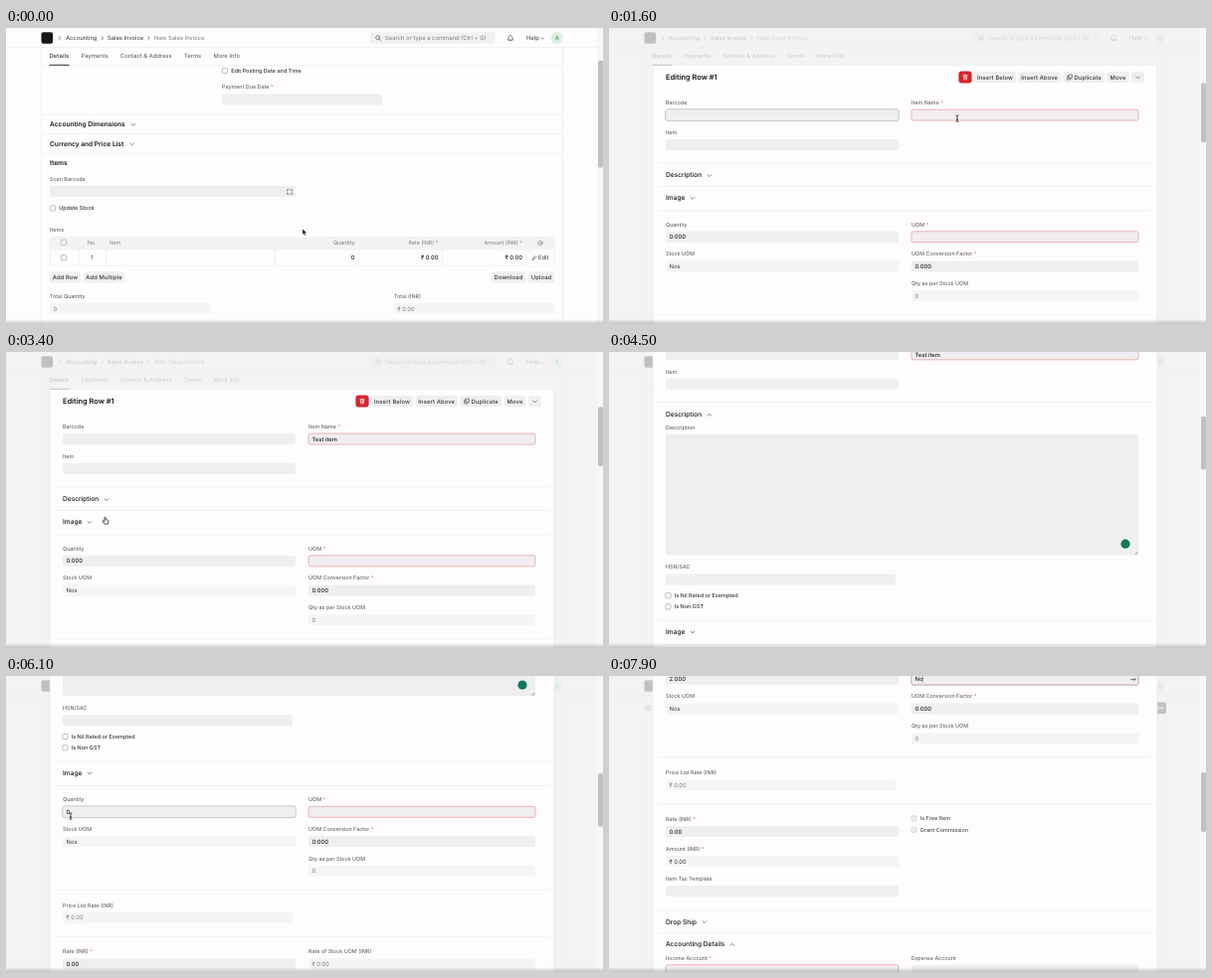
Write an HTML page that moves like this. It is 600 by 298 pixels and loops after 8000 ms.

```html
<!DOCTYPE html>
<html lang="en">
<head>
<meta charset="utf-8">
<title>New Sales Invoice</title>
<style>
html, body { margin: 0; width: 100%; height: 100%; overflow: hidden; background: #fefcfe; }
svg { display: block; width: 600px; height: 298px; font-family: Inter, Roboto, sans-serif; text-rendering: geometricPrecision; }
text { font-size: 5.83px; fill: #383838; white-space: pre; }
.l { font-size: 5.42px; fill: #525252; }
.v { font-weight: 500; fill: #1f1f1f; }
.dim { fill: #7c7c7c; }
.c { font-size: 5.5px; font-weight: 500; }
.h { font-size: 6.6px; font-weight: 600; fill: #171717; }
.m { font-size: 6.6px; font-weight: 500; fill: #171717; }
.t { font-size: 7.4px; font-weight: 600; fill: #171717; }
.b { font-weight: 500; letter-spacing: .02em; }
.tab { fill: #525252; }
.end { text-anchor: end; }
.mid { text-anchor: middle; }
.req { fill: #e57373; }
.in { fill: #f0eef0; }
.ro, .fixed { fill: #f6f5f6; }
.err { fill: #f0eef0; stroke: #e9a3a3; stroke-width: .8; }
.focus { fill: none; stroke: #c4c2c4; stroke-width: .9; }
.line { stroke: #ebeaeb; stroke-width: .6; }
.ico { fill: none; stroke: #525252; stroke-width: .7; stroke-linecap: round; stroke-linejoin: round; }
.box { fill: #fff; stroke: #8d8d8d; stroke-width: .6; }
.off { fill: #eeedee; stroke: #c9c8c9; stroke-width: .6; }
</style>
</head>
<body>
<svg id="stage" viewBox="0 0 600 298"></svg>
<script>
const LOOP = 8000, STEP = 100, FORM_Y = 185, GROW = 196, PAPER = '#fefcfe';

// Drawing helpers; text is placed by its vertical middle.
const text = (x, y, s, cls = '', id = '') =>
  `<text x="${x}" y="${y}" dy=".36em" class="${cls}" id="${id}">${s.replace(/ \*$/, ' <tspan class="req">*</tspan>')}</text>`;
const rect = (x, y, w, h, cls, r = 2, id = '') =>
  `<rect x="${x}" y="${y}" width="${w}" height="${h}" rx="${r}" class="${cls}" id="${id}"/>`;
const fill = (x, y, w, h, color, r = 0) =>
  `<rect x="${x}" y="${y}" width="${w}" height="${h}" rx="${r}" fill="${color}"/>`;
const hline = (x1, x2, y) => `<path class="line" d="M${x1} ${y}H${x2}"/>`;
const vline = (x, y1, y2) => `<path class="line" d="M${x} ${y1}V${y2}"/>`;
const icon = (x, y, d, extra = '') => `<path class="ico" transform="translate(${x} ${y})" d="${d}" ${extra}/>`;
const group = (id, body) => `<g id="${id}">${body}</g>`;
const DOWN = 'M-1.9 -.9L0 1L1.9 -.9', UP = 'M-1.9 .9L0 -1L1.9 .9', RIGHT = 'M-.8 -1.5L.8 0L-.8 1.5';

const valueClass = { ro: 'dim', fixed: '' };
const field = (x, y, w, label, value = '', cls = 'in', id = '') =>
  text(x, y, label, 'l') + rect(x, y + 7.1, w, 11, cls) +
  text(x + 3.5, y + 12.7, value, valueClass[cls] ?? 'v', id);
const ring = (x, w, y, id) => rect(x - .3, y + 6.7, w + .6, 11.8, 'focus', 2.3, id);
const check = (x, y, label, cls = 'box') =>
  rect(x + .4, y - 2.6, 5.2, 5.2, cls, 1.2) + text(x + 9.2, y, label, cls === 'off' ? 'c l' : 'c');
const button = (x, y, w, label) =>
  fill(x, y - 5.6, w, 11.2, '#f0eff0', 2) + text(x + w / 2, y, label, 'b mid');
const section = (y, label, chevX, cls = 'm', d = DOWN) =>
  text(cls === 'h' ? 44 : 57, y, label, cls) + icon(chevX, y + .4, d);

const page = [
  vline(35.7, 0, 900), vline(559.5, 0, 900),
  check(217, 43, 'Edit Posting Date and Time'),
  field(217, 59.5, 161, 'Payment Due Date *'),
  [87, 106.7, 126.3].map(y => hline(36, 559, y)).join(''),
  section(97, 'Accounting Dimensions', 128, 'h'),
  section(116.5, 'Currency and Price List', 126.5, 'h'),
  text(44, 136, 'Items', 'h'),
  field(44, 152, 247, 'Scan Barcode'),
  icon(285, 165, 'M-2.4 -1V-2.2H-1M1 -2.2H2.4V-1M2.4 1V2.2H1M-1 2.2H-2.4V1'),
  check(44, 181.5, 'Update Stock'),
  text(44, 203, 'Items', 'l'),
  fill(44, 210, 507, 12.5, '#f3f2f3', 2),
  rect(55.4, 213.4, 5.2, 5.2, 'box', 1.2),
  text(82, 216.3, 'No.', 'l dim'), text(104, 216.3, 'Item', 'l dim'),
  text(350.5, 216.3, 'Quantity', 'l dim end'),
  text(434.5, 216.3, 'Rate (INR) *', 'l dim end'),
  text(519, 216.3, 'Amount (INR) *', 'l dim end'),
  '<g class="ico" style="stroke:#8a8a8a;stroke-width:.6"><circle cx="537" cy="216.5" r="2.3"/><circle cx="537" cy="216.5" r=".8"/></g>',
  hline(44, 551, 223), hline(44, 551, 239.3), vline(44.2, 212, 239), vline(550.8, 212, 239),
  [73, 100.5, 270, 354.5, 438.5, 523].map(x => vline(x, 222.5, 239)).join(''),
  rect(55.4, 228.6, 5.2, 5.2, 'box', 1.2),
  text(86.5, 231.3, '1', 'mid'),
  text(350.5, 231.3, '0', 'v end'), text(434.5, 231.3, '₹ 0.00', 'v end'), text(519, 231.3, '₹ 0.00', 'v end'),
  icon(531, 231.5, 'M-1.7 1.7L-1.2 .3L1 -1.9L1.9 -1L-.3 1.2Z'), text(535, 231.3, 'Edit'),
  button(44, 251, 31, 'Add Row'), button(78, 251, 41, 'Add Multiple'),
  button(488, 251, 34, 'Download'), button(525, 251, 26, 'Upload'),
  field(44, 270, 161, 'Total Quantity', '0', 'ro'),
  field(390, 270, 161, 'Total (INR)', '₹ 0.00', 'ro')
].join('');

const header = group('tabs',
  fill(0, 0, 594, 38, PAPER) + hline(36, 559, 38) + vline(35.7, 20, 38) + vline(559.5, 20, 38) +
  text(43.5, 28.3, 'Details', 'b') + fill(43.5, 36.8, 20, .9, '#171717') +
  [[75.5, 'Payments'], [115, 'Contact &amp; Address'], [179, 'Terms'], [208.5, 'More Info']]
    .map(([x, s]) => text(x, 28.3, s, 'tab')).join('')) +
  group('pageHead',
    fill(0, 20, 594, 25, PAPER) + icon(39.5, 32, 'M-2.8 -2H2.8M-2.8 0H2.8M-2.8 2H2.8') +
    fill(541, 26.5, 19, 11.5, '#171717', 2) +
    '<text x="550.5" y="32.2" dy=".36em" class="b mid" style="fill:#fff">Save</text>') +
  fill(0, 0, 594, 19.6, PAPER) + hline(0, 594, 19.6) +
  fill(35.5, 4.2, 11.6, 11.6, '#171717', 2) +
  icon(54, 10.2, RIGHT) + text(60, 10.2, 'Accounting') +
  icon(97, 10.2, RIGHT) + text(102, 10.2, 'Sales Invoice') +
  icon(143.5, 10.2, RIGHT) + text(149, 10.2, 'New Sales Invoice', 'dim') +
  fill(366, 4.3, 125.5, 11.4, '#f2f1f2', 2) +
  '<g class="ico"><circle cx="373.6" cy="9.6" r="1.9"/><path d="M375 11L376.5 12.5"/></g>' +
  text(381, 10.2, 'Search or type a command (Ctrl + G)', 'dim') +
  icon(507, 10, 'M-2.6 1.7C-1.7 .8 -2 -.3 -1.7 -1.2C-1.1 -3.3 1.1 -3.3 1.7 -1.2C2 -.3 1.7 .8 2.6 1.7ZM-.8 2.7H.8') +
  text(523, 10.2, 'Help') + icon(539.2, 10.5, 'M-1.4 -.7L0 .7L1.4 -.7', 'style="stroke-width:.6"') +
  '<circle cx="553.7" cy="10" r="6" fill="#d9f0e1"/>' +
  '<text x="553.7" y="10.1" dy=".36em" class="mid" style="fill:#30915c">A</text>';

const LEFT = 57, RIGHT_X = 304;
const divider = y => hline(50, 545, y);

const form = [
  fill(44, 38, 507, 1500, PAPER), vline(44.2, 38, 1500), vline(550.8, 38, 1500),
  text(57, 49.7, 'Editing Row #1', 't'),
  fill(351.4, 43.4, 13.2, 12.2, '#d6262c', 3),
  icon(358, 49.5, 'M-2.2 -1.5H2.2M-.8 -1.5V-2.4H.8V-1.5M-1.6 -1.4L-1.4 2.4H1.4L1.6 -1.4M-.4 0V1.2M.5 0V1.2', 'style="stroke:#fff;stroke-width:.6"'),
  button(366.8, 49.5, 42.4, 'Insert Below'), button(411.5, 49.5, 42.4, 'Insert Above'),
  fill(456.2, 43.9, 42, 11.2, '#f0eff0', 2),
  icon(463, 49.5, 'M-.8 -2.4H2.4V.8H-.8ZM-.8 -.8H-2.4V2.4H.8V.8'), text(467.5, 49.5, 'Duplicate', 'b'),
  button(500.5, 49.5, 22, 'Move'),
  fill(525, 43.9, 13, 11.2, '#f0eff0', 2), icon(531.5, 49.8, DOWN),
  field(LEFT, 75, 234, 'Barcode'),
  ring(LEFT, 234, 75, 'barcodeRing'),
  field(RIGHT_X, 75, 228, 'Item Name *', '', 'err', 'itemName'),
  field(LEFT, 105, 234, 'Item'),
  divider(135.8),
  text(57, 148, 'Description', 'm'), icon(101, 148.6, DOWN, 'id="descChevron"'),
  group('details',
    text(57, 161.5, 'Description', 'l') +
    rect(57, 168, 475, 121.8, 'in') +
    icon(530, 287.8, 'M-1.5 1.2L1.2 -1.5M0 1.2L1.2 0', 'style="stroke-width:.4"') +
    '<circle id="dot" cx="519" cy="278.5" r="4.6" fill="#12795a"/>' +
    field(57, 301.6, 231, 'HSN/SAC') +
    check(56.5, 330.5, 'Is Nil Rated or Exempted') + check(56.5, 341.7, 'Is Non GST')),
  group('rest',
    divider(159.6) + section(171, 'Image', 84) + divider(184) +
    field(LEFT, 197.7, 234, 'Quantity', '', 'in', 'qty') +
    ring(LEFT, 234, 197.7, 'qtyRing') +
    field(RIGHT_X, 197.7, 228, 'UOM *', '', 'err', 'uom') +
    ring(RIGHT_X, 228, 197.7, 'uomRing') +
    icon(526.8, 210.5, 'M-2.2 0H2.2M.7 -1.5L2.2 0L.7 1.5', 'id="uomLink"') +
    field(LEFT, 227.5, 234, 'Stock UOM', 'Nos', 'fixed') +
    field(RIGHT_X, 227.5, 228, 'UOM Conversion Factor *', '0.000') +
    field(RIGHT_X, 257.2, 228, 'Qty as per Stock UOM', '0', 'ro') +
    divider(288.7) +
    field(LEFT, 304.2, 231, 'Price List Rate (INR)', '₹ 0.00', 'ro') +
    divider(335.7) +
    field(LEFT, 351, 234, 'Rate (INR) *', '0.00') +
    group('stockRate', field(RIGHT_X, 351, 228, 'Rate of Stock UOM (INR)', '₹ 0.00', 'ro')) +
    group('flags', check(303.5, 350.4, 'Is Free Item', 'off') + check(303.5, 361.8, 'Grant Commission', 'off')) +
    field(LEFT, 381, 234, 'Amount (INR) *', '₹ 0.00', 'fixed') +
    field(LEFT, 410.8, 234, 'Item Tax Template') +
    divider(443) + section(454.2, 'Drop Ship', 96) +
    divider(465.7) + section(477, 'Accounting Details', 124, 'm', UP) +
    field(LEFT, 490.7, 234, 'Income Account *', '', 'err') +
    field(RIGHT_X, 490.7, 228, 'Expense Account'))
].join('');

const pointers =
  '<path id="arrow" d="M0 0V6.2L1.5 4.9L2.5 7.2L3.6 6.7L2.6 4.5H4.5Z" fill="#111" stroke="#fff" stroke-width=".5"/>' +
  '<path id="hand" d="M-1 -3.1C-1 -4 .2 -4 .2 -3.1V-1.3L2.2 -.9C3 -.7 3 0 2.9 .8L2.4 3.2H-.8L-2.7 .6C-3.1 -.1 -2.2 -.7 -1.7 0L-1 .7Z" fill="#fff" stroke="#222" stroke-width=".8"/>' +
  '<path id="beam" d="M-1.4 -3.2Q0 -3.2 0 -2.2Q0 -3.2 1.4 -3.2M0 -2.2V2.4M-1.4 3.4Q0 3.4 0 2.4Q0 3.4 1.4 3.4M-.8 .9H.8" fill="none" stroke="#222" stroke-width=".8"/>';

document.getElementById('stage').innerHTML =
  '<defs><linearGradient id="edge" x2="0" y2="1"><stop offset="0" stop-opacity="0"/><stop offset="1" stop-opacity=".2"/></linearGradient></defs>' +
  fill(0, 0, 600, 298, PAPER) + group('page', page) + header +
  '<rect id="freeze" width="600" height="298" fill="#f1f0f1"/>' +
  group('form', form) +
  fill(594, 0, 6, 298, '#f8f7f8') + '<rect id="thumb" x="595" width="5" rx="2" fill="#c1c0c1"/>' +
  fill(0, 293, 600, 5, 'url(#edge)') + group('pointer', pointers);

const $ = id => document.getElementById(id);
const show = (id, on) => $(id).setAttribute('visibility', on ? 'inherit' : 'hidden');
const move = (id, x, y) => $(id).setAttribute('transform', `translate(${x} ${y})`);

// Eased value of a track of [time, ...values] points.
function at(track, t) {
  const i = track.findIndex(p => p[0] > t);
  if (i < 0) return track[track.length - 1].slice(1);
  if (i === 0) return track[0].slice(1);
  const a = track[i - 1], b = track[i];
  const k = (t - a[0]) / (b[0] - a[0]), e = k * k * (3 - 2 * k);
  return a.slice(1).map((v, n) => v + (b[n + 1] - v) * e);
}
// Latest entry of a list of [time, value].
const last = (list, t) => list.filter(p => p[0] <= t).pop()[1];

const scrollTrack = [[0, 0], [200, 0], [700, 48], [1000, 48], [1500, 185], [4100, 185], [5000, 389.5],
  [5200, 389.5], [5700, 454.5], [7399, 454.5], [7400, 392]];
const mouseTrack = [[0, 298, 202], [100, 298, 202], [800, 541, 184], [1000, 543.6, 185.3], [1100, 543.6, 185.3],
  [1600, 350, 91], [1800, 357, 89], [3100, 330, 110], [3400, 100, 170], [3600, 98, 150], [3700, 98, 150],
  [4000, 140, 205], [5100, 14, 200], [5300, 14, 190], [5800, 65, 141], [6700, 65, 141], [7200, 330, 138]];
const pointerAt = [[0, 'arrow'], [700, 'hand'], [1200, 'arrow'], [1500, 'beam'], [2000, ''], [3200, 'arrow'],
  [3400, 'hand'], [3800, 'beam'], [4500, ''], [5300, 'arrow'], [5700, 'beam'], [6300, ''], [6800, 'beam'], [7400, '']];
const qtyAt = [[0, '0.000'], [6100, '0.'], [6200, ''], [6400, '2'], [6800, '2.000']];
const uomAt = [[0, ''], [7200, '|'], [7400, 'N|'], [7900, 'No|']];

function typed(t) {
  if (t < 1900) return '';
  return 'Test item'.slice(0, t < 2300 ? 1 : 2 + Math.floor((t - 2300) / STEP));
}
// A trailing bar in the value stands for a thin caret.
const setValue = (id, s) => {
  $(id).innerHTML = s.replace('|', '<tspan style="font-weight:300" dx="-.6">|</tspan>');
};

function draw(t) {
  const [scroll] = at(scrollTrack, t), [mx, my] = at(mouseTrack, t);
  const open = t >= 1000, wide = t >= 3700 && t < 7400, done = t >= 7400;
  const total = wide ? 1655 : open ? 1480 : 822, ratio = 298 / total;

  move('page', 0, -scroll);
  move('form', 0, FORM_Y - scroll);
  move('rest', 0, wide ? GROW : 0);
  move('flags', 0, done ? 0 : 31);
  show('form', open);
  show('details', wide);
  show('dot', wide && t >= 4100 && t < 6300);
  show('stockRate', open && !done);
  show('pageHead', done);
  show('tabs', !done);
  $('descChevron').setAttribute('d', wide ? UP : DOWN);
  $('freeze').setAttribute('opacity', .78 * at([[1000, 0], [1300, 1]], t)[0]);

  show('barcodeRing', t >= 1300 && t < 1800);
  show('qtyRing', t >= 5900 && t < 7200);
  show('uomRing', t >= 7200);
  show('uomLink', done);
  setValue('itemName', typed(t));
  setValue('qty', last(qtyAt, t));
  setValue('uom', last(uomAt, t));

  $('thumb').setAttribute('y', (scroll + 90) * ratio);
  $('thumb').setAttribute('height', 298 * ratio);
  move('pointer', mx, my);
  const kind = last(pointerAt, t);
  for (const id of ['arrow', 'hand', 'beam']) show(id, id === kind);
}

const start = performance.now();
function tick(now) {
  const t = Math.max(0, now - start) % LOOP;
  draw(Math.floor(t / STEP) * STEP);
  requestAnimationFrame(tick);
}
draw(0);
requestAnimationFrame(tick);
</script>
</body>
</html>
```
